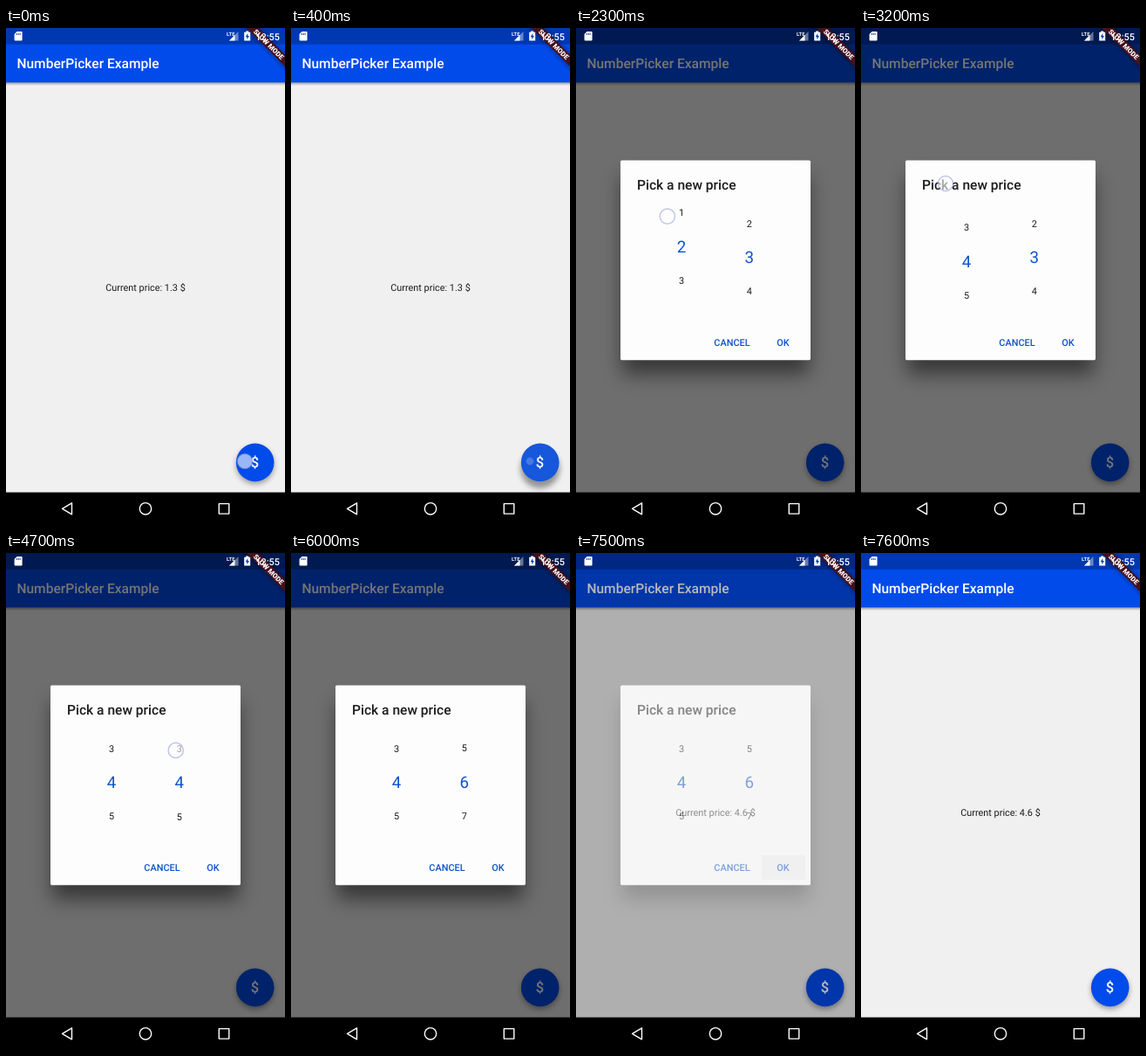
Recreate the animation shown at these times as an HTML page. Size 320 by 569 pixels, loop 8 s.

```html
<!DOCTYPE html>
<html lang="en">
<head>
<meta charset="utf-8">
<title>NumberPicker Example</title>
<style>
  html, body { margin: 0; width: 100%; height: 100%; overflow: hidden; background: #000; }
  svg { display: block; width: 320px; height: 569px; }
  text { font-family: Roboto, sans-serif; font-size: 10.9px; fill: #1c1c1c; text-rendering: geometricPrecision; }
  .mid { text-anchor: middle; }
  .bold { font-weight: 500; }
  .title { font-size: 15.57px; font-weight: 500; }
  .white { fill: #fff; }
  .blue { fill: #0c52cc; }
</style>
</head>
<body>
<svg viewBox="0 0 320 569">
  <defs>
    <filter id="soft" x="-50%" y="-50%" width="200%" height="200%"><feGaussianBlur stdDeviation="3"/></filter>
    <filter id="wide" x="-30%" y="-30%" width="160%" height="160%"><feGaussianBlur stdDeviation="11"/></filter>
    <linearGradient id="edge" x2="0" y2="1">
      <stop stop-opacity=".38"/><stop offset="1" stop-opacity="0"/>
    </linearGradient>
    <clipPath id="view"><rect x="51" y="204.2" width="218" height="116.8"/></clipPath>
  </defs>

  <rect width="320" height="532" fill="#f0f0f0"/>
  <rect y="62" width="320" height="4" fill="url(#edge)"/>
  <rect width="320" height="62.3" fill="#004bea"/>
  <rect width="320" height="18.7" fill="#0038b2"/>
  <text class="title white" x="12.4" y="46">NumberPicker Example</text>
  <text class="mid" id="price" x="160" y="301"></text>

  <circle id="fabShade" cx="285.7" filter="url(#soft)"/>
  <circle cx="285.7" cy="497.4" r="21.8" fill="#004bea"/>
  <circle id="splash" cx="285.7" cy="497.4" r="21.8" fill="#b0a868"/>
  <text class="mid bold white" x="285.5" y="503.4" style="font-size:16.6px">$</text>

  <g id="dialog">
    <rect width="320" height="532" opacity=".54"/>
    <rect x="53" y="170" width="214" height="226" opacity=".5" filter="url(#wide)"/>
    <rect x="51" y="151.6" width="218" height="228.6" rx="1.6" fill="#fdfdfd"/>
    <text class="title" x="70" y="185.3">Pick a new price</text>
    <g id="wheels" clip-path="url(#view)"></g>
    <rect id="hover" x="213" y="346" width="50" height="28" rx="1.6" fill="#f0f0f0"/>
    <text class="bold blue mid" x="179" y="364">CANCEL</text>
    <text class="bold blue mid" x="237.5" y="364">OK</text>
  </g>

  <g transform="translate(320 0) rotate(45)">
    <rect x="-40" y="21.8" width="80" height="9.3" opacity=".5" filter="url(#soft)"/>
    <rect x="-40" y="21.8" width="80" height="9.3" fill="#48101c"/>
    <text class="white mid" y="29.3" style="font-size:7.94px;font-weight:900">SLOW MODE</text>
  </g>

  <g fill="#fff">
    <path d="M12.6 4h5q1 0 1 1v8.6q0 1-1 1h-7q-1 0-1-1V7z"/>
    <path d="M12.4 6v2M14.3 6v2M16.2 6v2" stroke="#0038b2" stroke-width=".9"/>
    <text class="white" x="253" y="8.8" style="font-size:5.8px;font-weight:700">LTE</text>
    <path d="M266.5 4v10.5H256z" opacity=".4"/>
    <path d="M262.5 8v6.5H256z"/>
    <path d="M275.2 3.6h3v1.2h2v9.8h-7V4.8h2z"/>
    <path d="M277.3 6l-2.6 4.2h1.7v3l2.5-4.2h-1.6z" fill="#0038b2"/>
    <text class="white bold" x="314" y="13.5" text-anchor="end">12:55</text>
  </g>

  <rect y="531.6" width="320" height="38"/>
  <g fill="none" stroke="#fff" stroke-width="1.4" stroke-linejoin="round">
    <path d="M75.5 543.8v13l-11-6.500z"/>
    <circle cx="160" cy="550.300" r="6.700"/>
    <rect x="244.300" y="544.600" width="11.500" height="11.500"/>
  </g>

  <g id="touch">
    <circle r="8.600" fill="#fff" fill-opacity=".6" stroke="#8090cc" stroke-opacity=".5" stroke-width="1.500"/>
  </g>
</svg>

<script>
const LOOP = 8000, ROW = 38.93, MID = 262.6, REST = 3 * ROW, SETTLE = 350;
const $ = id => document.getElementById(id);

// The screen only refreshes at these moments (tenths of a second).
const refresh = [0, 1, 2, 3, 4, 6, 17, 18, 19, 23, 27, 29, 30, 32, 38, 40,
                 44, 47, 50, 52, 55, 60, 64, 68, 72, 75, 76];

// A finger drags the wheel up, then the wheel settles three rows on.
const swipes = [
  { start: 1700, length: 1000, lifted: 3800, top: 272, travel: 94, lead: -5.4, gap: 20,
    ease: p => p, x: p => 106 - 9 * p ** 4 },
  { start: 4400, length: 850, lifted: 6000, top: 252, travel: 105, lead: 12.8, gap: -2,
    ease: p => .54 * p + .46 * p * p, x: p => 202 - 10 * Math.sin(2.3 * p) }
];
const progress = (s, t) => Math.min(1, (t - s.start) / s.length);

function scrolled(s, t) {
  if (t < s.start) return 0;
  const after = t - s.start - s.length;
  return after < 0
    ? Math.max(0, s.lead + s.travel * s.ease(progress(s, t)))
    : REST - s.gap * Math.exp(-after / SETTLE);
}

function finger(t) {
  if (t < 600) return [274, 496];
  if (t >= 7200 && t < 7500) return [238, 363];
  const s = swipes.find(s => t >= s.start && t < s.lifted);
  if (!s) return null;
  const p = progress(s, t);
  return [s.x(p), s.top - s.travel * s.ease(p)];
}

function makeWheel(x, first, start) {
  const rows = [];
  for (let n = first; n < 10; n++) {
    const el = document.createElementNS("http://www.w3.org/2000/svg", "text");
    el.textContent = n;
    el.setAttribute("x", x);
    $("wheels").append(el);
    rows.push({ n, el });
  }
  return offset => {
    const chosen = start + Math.round(offset / ROW);
    for (const { n, el } of rows) {
      const size = n === chosen ? 18.7 : 10.9;
      el.setAttribute("class", n === chosen ? "mid blue" : "mid");
      el.style.fontSize = size + "px";
      el.setAttribute("y", MID + (n - start) * ROW - offset + size * .355);
    }
  };
}
const wheels = [makeWheel(121, 1, 1), makeWheel(198.7, 0, 3)];

function draw(t) {
  const press = t < 600 ? t / 400 : 0;
  const spot = finger(t);
  wheels.forEach((turn, i) => turn(scrolled(swipes[i], t)));
  $("dialog").setAttribute("opacity", t < 600 || t >= 7600 ? 0 : t < 7500 ? 1 : .5);
  $("hover").setAttribute("opacity", t >= 7200 ? 1 : 0);
  $("price").textContent = `Current price: ${t < 7500 ? "1.3" : "4.6"} $`;
  $("splash").setAttribute("opacity", press * .12);
  $("fabShade").setAttribute("cy", 500.5 + press * 4);
  $("fabShade").setAttribute("r", 21.5 + press);
  $("fabShade").setAttribute("opacity", .38);
  $("touch").style.display = spot ? "" : "none";
  if (spot) {
    $("touch").setAttribute("transform", `translate(${spot}) scale(${1 - press * .5})`);
    $("touch").setAttribute("opacity", 1 - press * .65);
  }
}

const begin = performance.now();
function tick() {
  const now = (performance.now() - begin) % LOOP;
  draw(100 * refresh.findLast(r => r * 100 <= now));
  requestAnimationFrame(tick);
}
tick();
</script>
</body>
</html>
```
